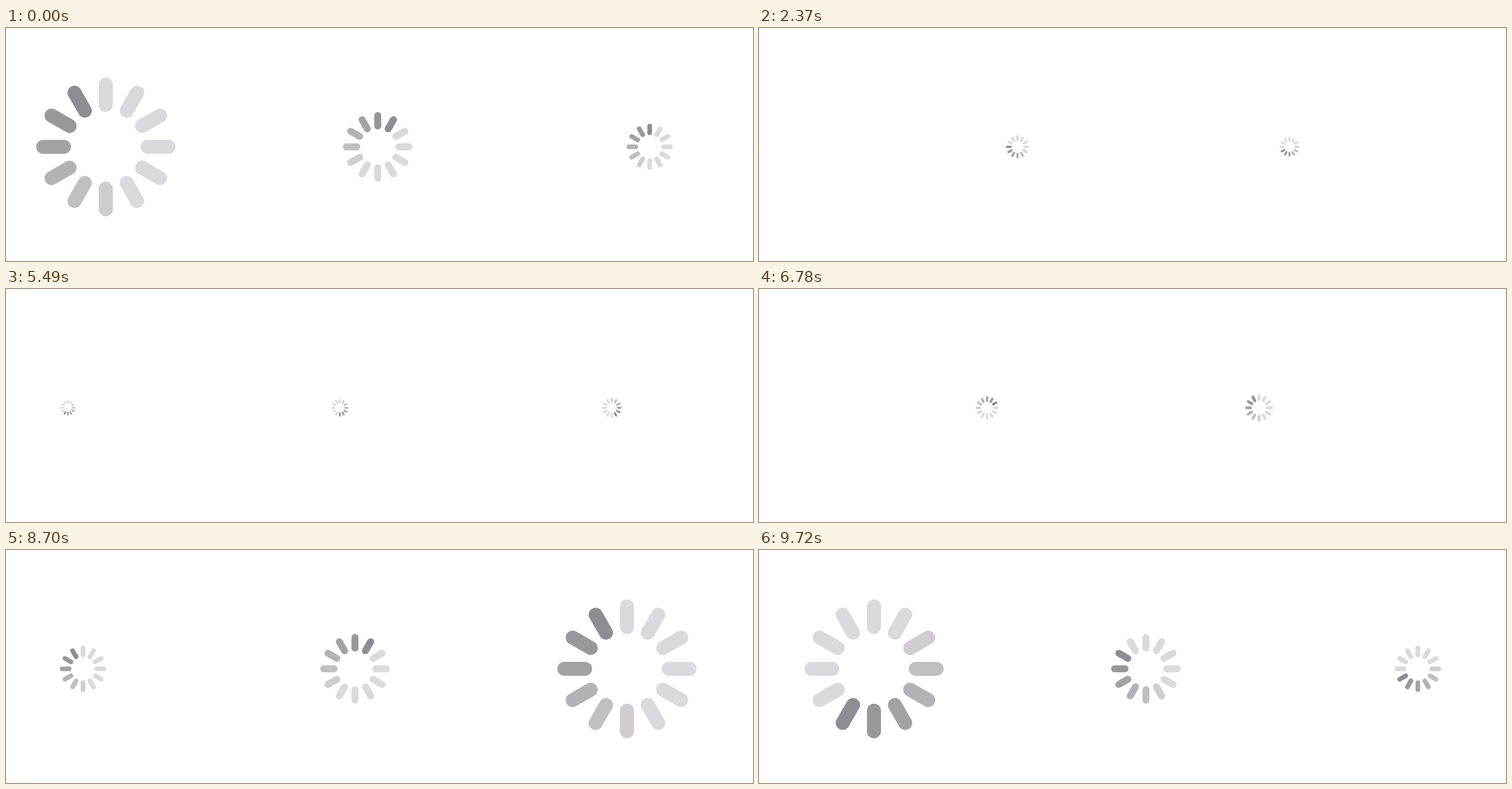
Recreate the animation shown at these times as an HTML page with a canvas. Size 1280 by 400 pixels, loop 9750 ms.

```html
<!DOCTYPE html>
<html lang="en">
<head>
<meta charset="utf-8">
<title>Scrolling spinners</title>
<style>
  html, body { margin: 0; width: 100%; height: 100%; overflow: hidden; background: #fff; }
  canvas { display: block; }
</style>
</head>
<body>
<canvas id="stage" width="1280" height="400"></canvas>
<script>
const ctx = document.getElementById('stage').getContext('2d');
const TICK = 30, TICKS = 325;
const GAP = 466, START_X = 171, CENTER_Y = 204;
const SPOKES = 12, SPOKES_PER_TICK = 0.247;

// Darkest spoke first, then its fading tail; the rest share the last grey.
const GREYS = ['#8e8d94', '#98989a', '#a3a3a4', '#b3b3b5', '#c0c0c0', '#cfcdd0', '#dadadc'];

// Starting spoke of each spinner in the row.
const PHASES = [11.6, 1.98, 0.02, 1.4, 1.6, 2, 1, 0.5, 0, 11, 10.3, 9.3, 8.3, 7, 4, 1.4, 0.02, 1.98];
const COUNT = PHASES.length;

// Scroll distance at given ticks; the speed is slightly uneven.
const SCROLL = [[0, 0], [25, 660], [79, 2058], [183, 4725], [290, 7495], [324, 8362], [325, 8388]];

function scrollAt(tick) {
  const i = SCROLL.findIndex(([end]) => end > tick);
  const [t0, x0] = SCROLL[i - 1], [t1, x1] = SCROLL[i];
  return x0 + (x1 - x0) * (tick - t0) / (t1 - t0);
}

function drawSpinner(x, scale, head) {
  ctx.save();
  ctx.translate(x, CENTER_Y);
  ctx.scale(scale, scale);
  ctx.lineWidth = 24;
  ctx.lineCap = 'round';
  for (let i = 0; i < SPOKES; i++) {
    const age = (head - i + SPOKES) % SPOKES;
    ctx.strokeStyle = GREYS[Math.min(age, GREYS.length - 1)];
    ctx.beginPath();
    ctx.moveTo(0, -71.7);
    ctx.lineTo(0, -107.3);
    ctx.stroke();
    ctx.rotate(2 * Math.PI / SPOKES);
  }
  ctx.restore();
}

function draw(tick) {
  ctx.clearRect(0, 0, 1280, 400);
  const left = START_X - scrollAt(tick);
  for (let k = 0; k < COUNT + 3; k++) {
    const x = left + k * GAP;
    if (x < -120 || x > 1400) continue;
    const item = k % COUNT;
    // Sizes run 1, 1/2, 1/3 … 1/10 and back again.
    const divisor = 1 + Math.min(item, COUNT - item);
    const head = Math.floor(PHASES[item] + tick * SPOKES_PER_TICK) % SPOKES;
    drawSpinner(x, 1 / divisor, head);
  }
}

const begin = performance.now();
function loop() {
  draw(Math.floor((performance.now() - begin) / TICK) % TICKS);
  requestAnimationFrame(loop);
}
loop();
</script>
</body>
</html>
```
